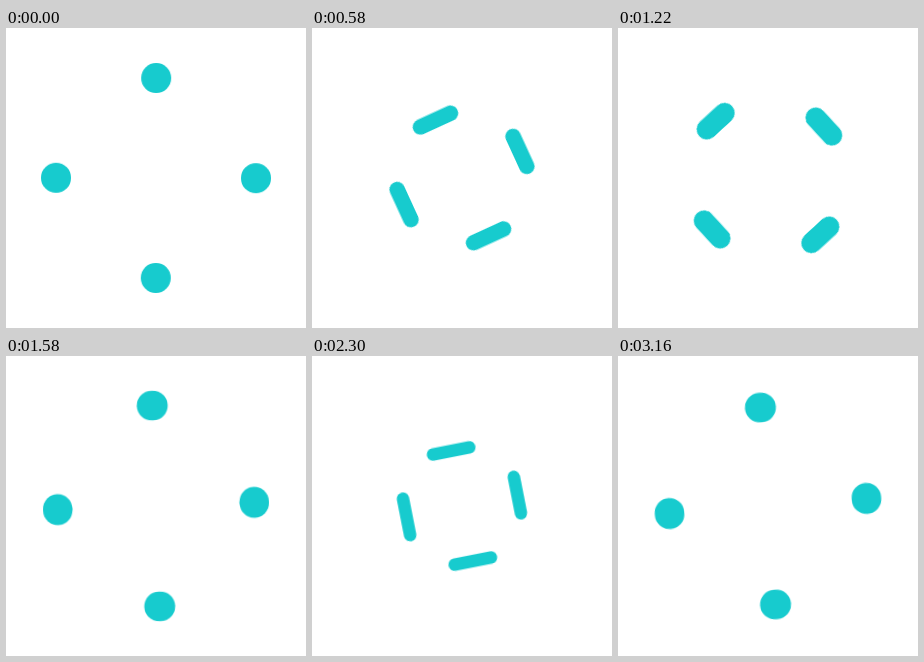
An HTML page for the animation above (3180 ms loop, 300 by 300 pixels).

```html
<!DOCTYPE html>
<html lang="en">
<head>
<meta charset="utf-8">
<title>Loader</title>
<style>
  html, body {
    margin: 0;
    width: 100%;
    height: 100%;
    overflow: hidden;
    background: #fff;
  }

  svg {
    display: block;
    width: 100%;
    height: 100%;
  }

  .wheel {
    animation: spin 3180ms linear infinite;
  }

  rect {
    --far: 99.5px;
    fill: #17cbce;
    animation:
      slide 3180ms linear infinite,
      stretch 3180ms infinite;
  }

  .tall rect {
    --far: 101.7px;
  }

  /* The loop restarts one step short of a full turn. */
  @keyframes spin {
    from { transform: rotate(0deg); }
    to { transform: rotate(357.75deg); }
  }

  /* Distance from the centre and thickness */
  @keyframes slide {
    0%, 100% { y: -115px; height: 30px; rx: 15px; ry: 15px; }
    25.157%, 75.472% { y: -55px; height: 10px; rx: 5px; ry: 5px; }
    50.314% { y: calc(-15px - var(--far)); height: 30px; rx: 15px; ry: 15px; }
  }

  /* Length: quadratic out, then quadratic in */
  @keyframes stretch {
    0%, 50.314%, 100% {
      x: -15px;
      width: 30px;
      animation-timing-function: cubic-bezier(.3333, .6667, .6667, 1);
    }
    25.157%, 75.472% {
      x: -25px;
      width: 50px;
      animation-timing-function: cubic-bezier(.3333, 0, .6667, .3333);
    }
  }
</style>
</head>
<body>
<svg viewBox="-150 -150 300 300">
  <g class="wheel">
    <g class="tall"><rect x="-15" y="-115" width="30" height="30" rx="15"/></g>
    <g transform="rotate(90)"><rect x="-15" y="-115" width="30" height="30" rx="15"/></g>
    <g class="tall" transform="rotate(180)"><rect x="-15" y="-115" width="30" height="30" rx="15"/></g>
    <g transform="rotate(270)"><rect x="-15" y="-115" width="30" height="30" rx="15"/></g>
  </g>
</svg>
</body>
</html>
```
